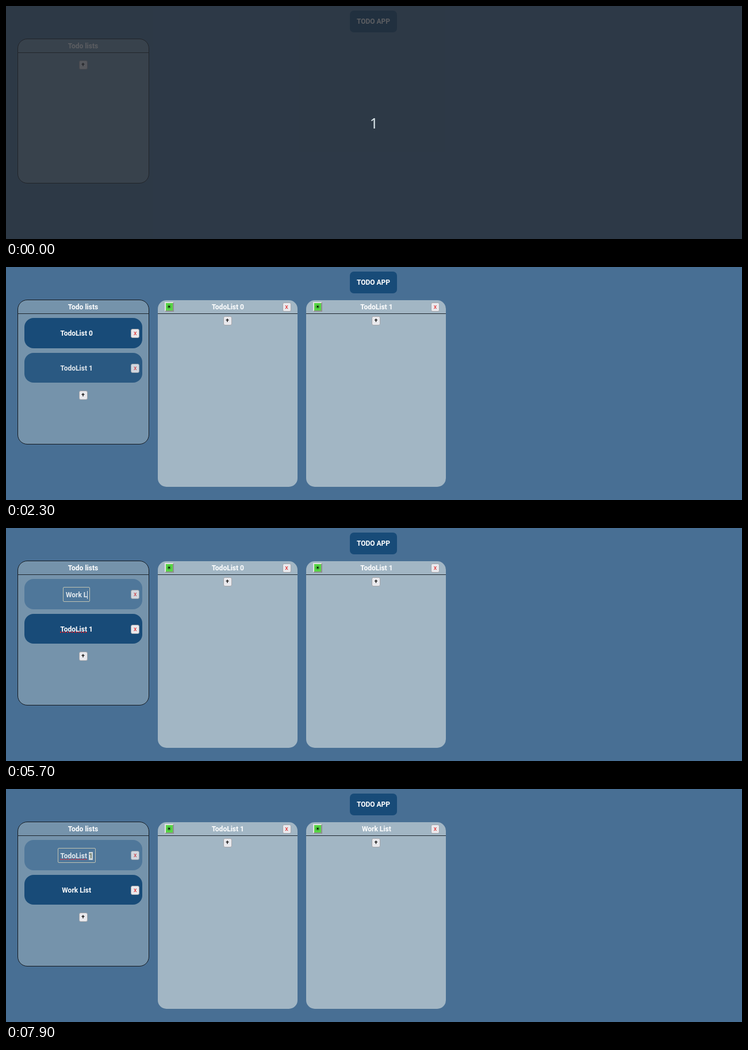
These frames come from a looping animation (1280x407 px, 8000 ms). An HTML page:

```html
<!DOCTYPE html>
<html lang="en">
<head>
<meta charset="utf-8">
<title>Todo app</title>
<style>
html, body { margin: 0; width: 100%; height: 100%; overflow: hidden; background: #486f94; }
body { font: bold 12px Roboto, sans-serif; color: #fff; }
div { position: absolute; box-sizing: border-box; text-align: center; white-space: nowrap; }
.title { background: #184b78; border-radius: 7px; }
.lists { background: #7593ab; border: 1px solid #151a20; border-radius: 17px; }
.panel { background: #a2b6c4; border-radius: 15px; }
.rule { background: #1c242c; }
.item { background: #184b78; border-radius: 16px; }
.item.focus { background: #467197; }
.item.hover { opacity: .8; }
.button { background: #e9e9ed; border: 1px solid #a3a5aa; border-radius: 3px; color: #111; font: bold 10px/14px Roboto, sans-serif; }
.button.hover { background: #d0d0d7; }
.close { color: #e01b1b; font: 11px/14px Roboto, sans-serif; }
.sun { background: #57d645; border: 2px outset #e4e4e4; color: #000; font: 10px/13px "DejaVu Sans", sans-serif; }
.edit { display: inline-block; vertical-align: top; height: 24px; padding: 0 4px; border: 1px solid #d4d0b4; border-radius: 2px; }
u { text-decoration: underline dotted #e0202c 1.5px; text-underline-offset: 1px; text-decoration-skip-ink: none; }
mark { background: #e6e9e6; color: #6d7657; }
i { border-right: 1px solid #fff; margin-right: -1px; }
.shade { background: rgba(36, 39, 45, .75); }
.count { color: #dfeaee; font: 25px/40px "Noto Sans", sans-serif; }
</style>
</head>
<body>
<script>
const LOOP = 8000;

// Each step changes part of the state at the given time.
const steps = [
  [0, { loading: true, items: [], panels: [], hover: null, focus: false, select: -1, caret: false, spell: false }],
  [100, { loading: false }],
  [800, { hover: '+' }],
  [1100, { items: ['TodoList 0'], panels: ['TodoList 0'], hover: null }],
  [1200, { hover: 0 }],
  [1500, { hover: null }],
  [1700, { hover: '+' }],
  [2200, { items: ['TodoList 0', 'TodoList 1'], panels: ['TodoList 0', 'TodoList 1'], hover: null }],
  [2300, { hover: 1 }],
  [2400, { hover: null }],
  [2500, { hover: 0 }],
  [2700, { focus: true, caret: true }],
  [2800, { spell: true }],
  [2900, { select: 9, caret: false, hover: null }],
  [3100, { select: 0 }],
  [3300, { hover: 0 }],
  [4100, { ...typed('W'), select: -1, caret: true }],
  [4400, typed('Wo')],
  [4600, typed('Wor')],
  [4700, typed('Work')],
  [4900, { caret: false }],
  [5700, { ...typed('Work L'), caret: true }],
  [5900, typed('Work Li')],
  [6100, typed('Work Lis')],
  [6200, typed('Work List')],
  [6300, { caret: false }],
  [6500, { items: ['TodoList 1', 'Work List'], panels: ['TodoList 1', 'Work List'], focus: false }],
  [6900, { hover: null }],
  [7000, { hover: 1 }],
  [7400, { hover: null }],
  [7500, { hover: 0 }],
  [7700, { focus: true, caret: true }],
  [7900, { select: 9, caret: false }],
];

function typed(text) {
  return { items: [text, 'TodoList 1'] };
}

function box(x, y, w, h, cls, html = '') {
  return `<div class="${cls}" style="left:${x}px;top:${y}px;width:${w}px;height:${h}px">${html}</div>`;
}

const label = (x, y, html) =>
  `<div style="left:${x - 70}px;top:${y - 13}px;width:140px;line-height:26px">${html}</div>`;
const button = (x, y, cls, text) => box(x - 7.5, y - 7.5, 15, 16, 'button ' + cls, text);

function item(text, n, s) {
  const focus = s.focus && n === 0;
  const mark = part => s.spell ? part.replace('TodoList', '<u>$&</u>') : part;
  let html = mark(text);
  if (focus) {
    if (s.select >= 0) {
      html = mark(text.slice(0, s.select)) + `<mark>${mark(text.slice(s.select))}</mark>`;
    }
    html = `<span class="edit">${html}${s.caret ? '<i></i>' : ''}</span>`;
  }
  const cls = 'item' + (focus ? ' focus' : '') + (s.hover === n ? ' hover' : '');
  return box(32, 89 + n * 60.6, 205, 52.5, cls,
    label(90.7, 27, html) + button(192.7, 26.5, 'close', 'x'));
}

function panel(name, n) {
  return box(263.5 + n * 258.6, 57.5, 243, 326, 'panel',
    box(0, 23.5, 243, 1, 'rule') +
    box(12, 3.5, 16, 17, 'sun', '☀') +
    label(122.3, 12.5, name) +
    button(224.5, 12, 'close', 'x') +
    button(121.5, 36, '', '+'));
}

function view(s) {
  const add = s.hover === '+' ? 'hover' : '';
  return box(598, 7.5, 82, 38.5, 'title') + label(639, 27, 'TODO APP') +
    box(20, 57, 229, 253, 'lists') + box(20, 81, 229, 1, 'rule') + label(134, 70, 'Todo lists') +
    s.items.map((text, n) => item(text, n, s)).join('') +
    button(134, 102 + s.items.length * 60.6, add, '+') +
    s.panels.map(panel).join('') +
    (s.loading ? box(0, 0, 1280, 407, 'shade') + box(600, 184, 80, 40, 'count', '1') : '');
}

let shown = 0;
function draw() {
  const time = performance.now() % LOOP;
  const count = steps.filter(([at]) => at <= time).length;
  if (count !== shown) {
    shown = count;
    const state = Object.assign({}, ...steps.slice(0, count).map(step => step[1]));
    document.body.innerHTML = view(state);
  }
  requestAnimationFrame(draw);
}
draw();
</script>
</body>
</html>
```
